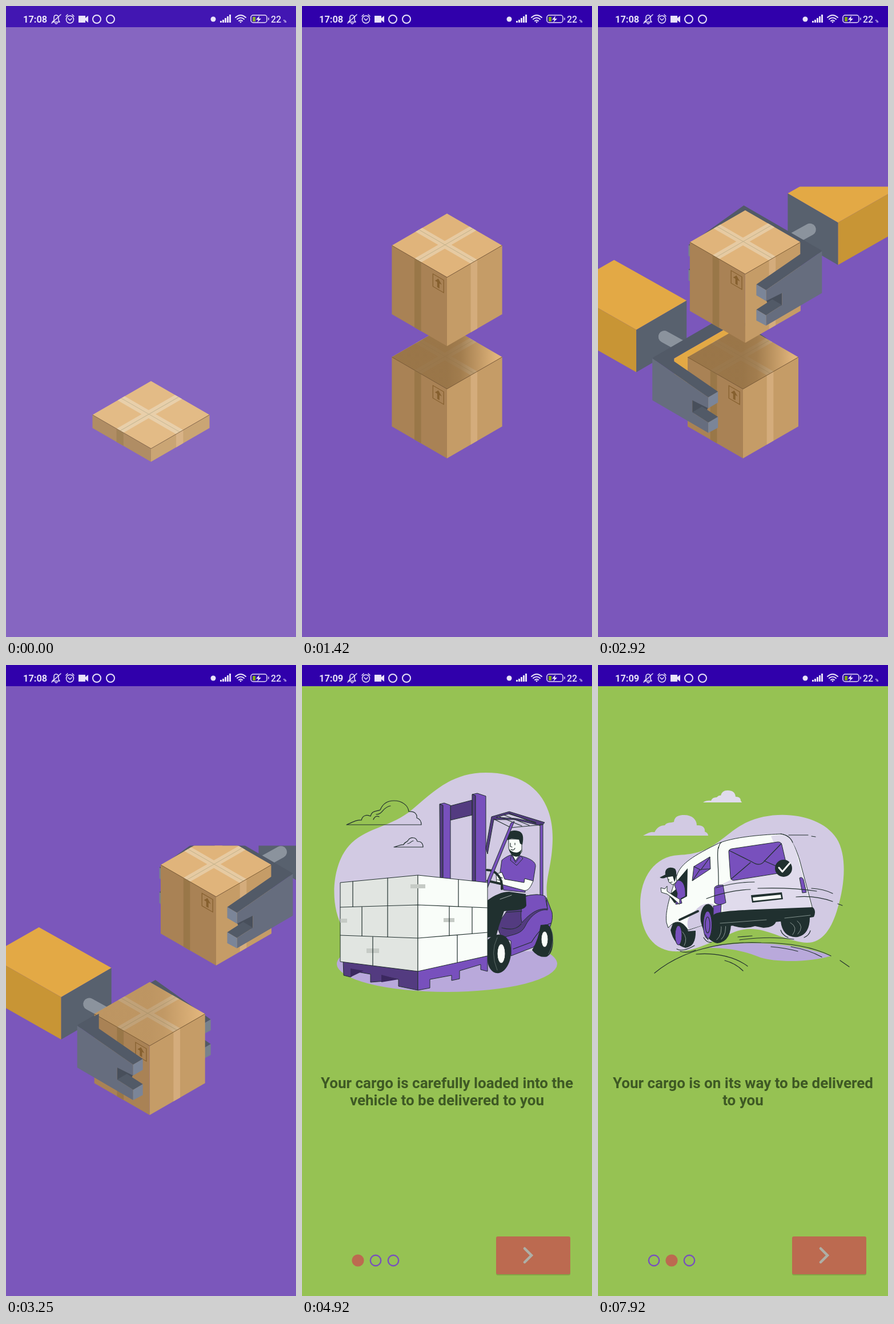
These frames come from a looping animation (508x1102 px, 8 s). An HTML page with a canvas:

```html
<!DOCTYPE html>
<html lang="en">
<head>
<meta charset="utf-8">
<title>Parcel onboarding</title>
<style>
html, body { margin: 0; width: 100%; height: 100%; overflow: hidden; background: #7b57bb; }
canvas, svg { position: absolute; left: 0; top: 0; width: 508px; height: 1102px; }
text { font-family: Roboto, sans-serif; }
.caption { font-size: 26px; font-weight: 700; fill: #3e5924; text-anchor: middle; }
.line { fill: none; stroke: #22302f; stroke-width: 1.2; stroke-linecap: round; stroke-linejoin: round; }
.edge { stroke: #22302f; stroke-width: 1; stroke-linejoin: round; }
.white { fill: #f9fdf9; } .grey { fill: #e1e5e1; } .label { fill: #c5cac5; }
.purple { fill: #7850bd; } .deep { fill: #533b80; } .dark { fill: #20302f; }
.blob { fill: #d2cae3; } .floor { fill: #b9a9db; }
.hollow { fill: none; stroke: #7850bd; stroke-width: 2.4; } .brick { fill: #bc6a50; }
.icon { fill: none; stroke: #e9e2f8; stroke-width: 1.5; stroke-linecap: round; stroke-linejoin: round; }
.solid { fill: #e9e2f8; }
</style>
</head>
<body>
<canvas id="stage" width="508" height="1102"></canvas>
<svg viewBox="0 0 508 1102">
<g id="pages">
  <rect y="37" width="508" height="1065" fill="#96c253"/>
  <g id="loading">
    <ellipse class="floor" cx="254" cy="522" rx="193" ry="49"/>
    <path class="blob" d="M72 460C48 420 52 350 82 316C108 286 150 284 186 258C226 226 258 188 322 188C396 188 440 230 439 305C438 355 424 375 430 410L410 500H100Z"/>
    <path class="line" d="M78 279C90 274 96 270 104 271C106 262 114 261 120 264C123 253 132 256 137 253C142 241 150 237 161 237C175 237 186 245 187 256C198 255 202 261 201 267C207 269 209 274 209 279ZM125 270C127 264 132 263 135 265M130 261C143 260 140 249 155 246M161 318C169 316 173 313 178 314C179 309 184 310 186 306C190 300 200 300 202 308C209 308 212 312 212 318ZM185 312C190 312 190 308 195 307"/>
    <g class="edge">
      <path class="deep" d="M260 246L298 236V262L260 271ZM241 243L247 245V380H242ZM298 226L304 228V385H298Z"/>
      <path class="purple" d="M241 243L249 241L260 245V380H247V245ZM298 226L307 224L322 229V385H304V228Z"/>
      <path class="deep" d="M322 320L332 265L363 256L425 275L420 281L372 270L336 270L325 330Z"/>
      <path class="blob" d="M340 266L362 260L410 275L375 268Z"/>
      <path class="purple" d="M417 278H422V410H417Z"/>
      <path class="line" d="M346 265L385 281M354 262L398 280M363 259L410 277M336 269L366 284L421 279"/>
      <path class="deep" d="M341 455L360 428L388 424L392 403L412 401L425 404L431 430L390 470L350 478Z"/>
      <path class="purple" d="M352 476C372 470 384 470 391 456C399 439 416 425 430 428L428 406L438 432C440 445 436 452 434 460L405 493L366 508L366 482Z"/>
      <path class="purple" d="M391 404C404 400 420 400 426 404L430 426C410 424 396 438 385 450C382 436 384 420 391 404Z"/>
    </g>
    <path class="line" d="M357 432L385 430M350 459C365 463 376 462 384 452M370 496L402 484C414 465 426 454 436 451"/>
    <path class="dark" d="M325 411C337 402 350 396 363 396L392 400L393 420C390 430 366 428 354 430L345 456L340 474L325 476Z"/>
    <g class="edge">
      <path class="purple" d="M350 341C359 333 366 332 370 330L385 334C400 338 410 344 409 352L405 377L390 374L391 397L353 393L347 362Z"/>
      <path class="white" d="M390 373L405 377C401 387 397 394 390 394L353 384L341 382L340 365L350 362L355 374L389 380Z"/>
      <path class="white" d="M362 304L385 304L385 326L374 342L368 331L362 320Z"/>
      <path class="purple" d="M367 331L374 345L383 333L387 338L376 350L365 341Z"/>
    </g>
    <path class="dark" d="M359 302C359 290 369 287 379 290C387 292 389 300 386 314L382 312L380 305L367 303L360 306ZM362 321C367 327 379 332 385 321L382 332C376 338 365 334 362 321Z"/>
    <path class="line" d="M365 311V317L368 318M373 311V314M366 322Q371 325 373 320M364 298Q369 293 380 296M343 369L351 372M342 375L351 377"/>
    <path class="line" stroke-width="3" style="stroke-width:4" d="M324 358C341 358 352 374 350 391M325 377L348 382"/>
    <path class="line" style="stroke-width:.7;stroke:#dce2df" d="M347 409L367 402"/>
    <path class="purple edge" d="M366 276L372 273L325 389L325 375Z"/>
    <ellipse class="dark" cx="428" cy="481" rx="12" ry="28"/>
    <path class="dark" d="M403 498Q414 480 418 454L430 453L430 509Q415 513 403 498Z"/>
    <ellipse class="white edge" cx="425" cy="479" rx="6" ry="14"/>
    <path class="dark" d="M325 480C338 467 358 466 365 488C370 510 360 535 345 538C333 540 325 527 325 515Z"/>
    <ellipse class="white edge" cx="349" cy="504" rx="7" ry="17"/>
    <path class="line" style="stroke:#81908c;stroke-width:.6" d="M342 476Q329 502 342 533M435 457Q446 480 432 505"/>
    <path class="deep edge" d="M72 516L203 533V568L169 561V549L145 544L145 552L120 554V540L97 536L85 545L73 542Z"/>
    <path class="purple edge" d="M203 533L325 508V535L313 532V523L276 534V548L262 551V542L224 549V564L203 568Z"/>
    <path fill="#3b285f" d="M85 530L108 534L85 545ZM139 541L169 549L139 554Z"/>
    <path class="grey edge" d="M67 380L203 367V535L67 518Z"/>
    <path class="white edge" d="M203 367L325 380V508L203 535Z"/>
    <path class="label" d="M190 383H216V390H190ZM248 442H267V449H248ZM67 443H79V450H67ZM113 495H135V503H113Z"/>
    <path class="line" d="M67 423L203 419L325 424M67 472L203 477L325 467M89 378V422M150 372V420M105 422V473M150 421V475M124 474V525M274 375V422M258 421V473M298 423V469M272 472V519"/>
    <text class="caption" x="254" y="739">Your cargo is carefully loaded into the</text>
    <text class="caption" x="254" y="769">vehicle to be delivered to you</text>
    <circle class="brick" cx="98" cy="1040" r="10.6"/>
    <circle class="hollow" cx="129" cy="1040" r="9.2"/>
  </g>
  <g id="driving">
    <path class="blob" d="M74 418C74 370 100 334 141 332C205 330 215 298 260 275C310 251 390 259 418 303C437 333 432 385 420 424C409 463 390 491 356 484C310 476 281 448 235 468C196 485 167 502 131 500C91 496 74 460 74 418Z"/>
    <path class="blob" d="M79 298C87 294 91 291 99 292C103 284 109 280 117 280C121 274 128 276 133 274C134 264 142 262 151 262C165 262 173 270 173 280C184 279 188 285 187 291C192 293 193 296 193 298Z"/>
    <path fill="#e0dbec" d="M184 240Q190 236 198 237Q200 231 208 231Q212 227 215 228Q217 219 227 219Q240 219 241 230Q250 230 250 237L252 240Z"/>
    <path class="floor" d="M190 494C265 478 350 487 408 508C370 520 310 519 285 511C260 501 231 493 190 494Z"/>
    <path class="line" d="M99 538C146 499 214 482 286 485C341 485 378 493 408 508M424 516L440 527M172 505C207 502 241 510 262 526M222 516Q241 521 254 534M303 492Q328 494 350 500M338 492Q371 498 392 510M245 475L270 473M248 480Q300 473 343 479M138 496Q148 502 169 490M144 500Q155 504 171 498"/>
    <path class="dark" d="M232 452L312 447Q310 458 290 459L275 456Q258 462 238 456ZM320 447L371 438Q372 470 350 475Q323 477 320 447Z"/>
    <path class="dark" d="M133 446Q151 445 158 465L171 464Q172 492 153 494Q133 489 127 463Z"/>
    <ellipse class="purple edge" cx="141" cy="472" rx="6" ry="17"/>
    <path class="white edge" d="M120 450C117 430 127 400 139 365C145 350 159 337 206 314C233 299 300 296 320 295C336 296 345 315 353 340L375 422L374 433L205 447L158 463Q141 437 123 459Z"/>
    <path fill="#e0dbec" d="M303 299C330 292 340 300 348 329L374 424L218 430L219 382L231 376L331 362Z"/>
    <path fill="#d2cae3" d="M170 429Q186 411 205 419L201 449L159 462Q151 443 170 429Z"/>
    <path class="line" d="M211 318C207 330 212 350 211 386M211 320Q213 311 216 310M320 295Q336 297 341 310"/>
    <path class="dark" d="M180 448C177 422 193 408 202 425L206 447L233 444Q235 483 209 486Q188 482 180 448Z"/>
    <ellipse class="purple edge" cx="192" cy="454" rx="7.5" ry="24"/>
    <ellipse class="line" cx="192" cy="454" rx="4" ry="14"/>
    <path class="line" style="stroke:#a5b2ad;stroke-width:.8" d="M215 450Q219 470 208 480M223 448Q226 470 216 479M148 466Q158 477 151 490M337 450Q351 458 341 471M349 447Q362 457 350 470"/>
    <path class="purple edge" d="M204 389Q206 384 219 384L224 415Q211 422 204 415ZM202 421L216 418L215 435L202 440ZM353 372Q357 369 360 375L365 397L358 398Z"/>
    <path class="dark" d="M202 437C206 430 240 429 276 427L376 423Q383 429 378 440Q320 450 209 457Q200 453 202 437Z"/>
    <path class="line" style="stroke:#9aa9a4;stroke-width:.8" d="M214 451L295 445M327 442L372 437"/>
    <path class="purple edge" d="M229 326Q229 322 234 321L315 309Q321 309 322 314L332 357Q332 362 327 362L239 376Q233 377 232 370ZM168 352L196 335L197 356L165 377Z"/>
    <path class="line" d="M230 324L270 344Q284 353 292 342L321 312M233 374L267 345M291 342L330 359M168 352L180 358L196 336M166 376L178 358M182 357L196 356"/>
    <path class="dark" d="M268 402L322 397L324 409L270 415Z"/>
    <path class="white" d="M271 406L320 401L321 407L272 412Z"/>
    <path class="line" style="stroke-width:4" d="M143 445L175 430"/>
    <circle class="dark" cx="325" cy="355" r="15"/>
    <path class="line" style="stroke:#fff;stroke-width:3" d="M317 354L323 361L336 346"/>
    <path class="line" d="M334 297L368 297M374 299L381 300M207 389Q242 379 274 379M190 408Q230 393 267 392M280 390Q337 388 383 395M374 390Q395 391 411 399M347 405Q381 402 411 413M420 417L428 420M185 476Q191 486 199 484M188 471L193 480M372 464Q370 472 361 476M320 463Q323 472 333 476"/>
    <path class="dark" d="M157 355L156 404L134 416L124 402L136 392L140 375Z"/>
    <path class="purple edge" d="M139 376C149 375 154 386 153 404L145 408L147 416L136 418L139 399L134 384Z"/>
    <path class="white edge" d="M121 369L137 366L138 378L131 384L124 379ZM143 409L143 418L132 408L121 400L111 397L110 389L117 391L121 386L121 395L134 404Z"/>
    <path class="dark" d="M108 371L118 366C116 354 127 351 135 356C139 361 137 372 134 379L131 369L119 371Q113 374 108 371Z"/>
    <path class="line" d="M124 374V376M126 380L130 379"/>
    <text class="caption" x="254" y="739">Your cargo is on its way to be delivered</text>
    <text class="caption" x="254" y="769">to you</text>
    <circle class="hollow" cx="98" cy="1040" r="9.2"/>
    <circle class="brick" cx="129" cy="1040" r="10.6"/>
  </g>
  <circle class="hollow" cx="160" cy="1040" r="9.2"/>
  <rect x="340" y="1000" width="130" height="66" rx="3" fill="#4f6b25" opacity=".3"/>
  <rect class="brick" x="340" y="998" width="130" height="66" rx="3"/>
  <path d="M390 1019L402 1031L390 1043" fill="none" stroke="#aeafa6" stroke-width="4.5" stroke-linecap="round"/>
</g>
<rect width="508" height="37" fill="#3000ab"/>
<text class="solid" id="clock" x="30" y="28.5" font-size="16.4" font-weight="700"></text>
<g class="icon">
  <path d="M81 28H94L92 25V20Q91 16 88 16Q84 16 84 20V25ZM86 30Q88 32 90 30M80 30L96 15"/>
  <circle cx="112" cy="23.5" r="6.5"/><path d="M109 22L112 25L115 22M105 18L108 15M119 18L116 15"/>
  <circle cx="159" cy="23" r="7" stroke-width="2"/><circle cx="183" cy="23" r="7" stroke-width="2"/>
  <path d="M402 20Q411 12 420 20M405 23Q411 18 417 23M408 26Q411 23.500 414 26" stroke-width="2"/>
  <rect x="429" y="16" width="28" height="13" rx="4"/><path d="M460 21V24"/>
</g>
<rect x="432" y="19" width="5" height="8" fill="#7ea51b"/>
<path class="solid" d="M127 17H139V21L144 17V29L139 25V29H127ZM375 26H378V29H375ZM379 24H382V29H379ZM383 21H386V29H383ZM387 18H390V29H387ZM391 15H394V29H391ZM409 27H413L411 30ZM444 17L438 24H442L440 29L447 22H443Z"/>
<circle class="solid" cx="363" cy="23" r="4.5"/>
<text class="solid" x="464" y="28.5" font-size="16" font-weight="500">22</text>
<text class="solid" x="485.500" y="28.500" font-size="8" font-weight="700">%</text>
<rect id="haze" width="508" height="1102" fill="#fff"/>
</svg>
<script>
const LOOP = 8000;
const ISO = 0.577;
const ctx = document.getElementById('stage').getContext('2d');
const [pages, loading, driving, clock, haze] =
  ['pages', 'loading', 'driving', 'clock', 'haze'].map(id => document.getElementById(id));

const span = (t, from, to) => Math.min(1, Math.max(0, (t - from) / (to - from)));
const mix = (a, b, p) => a + (b - a) * p;
const smooth = p => p * p * (3 - 2 * p);

function poly(color, ...pts) {
  ctx.beginPath();
  for (let i = 0; i < pts.length; i += 2) ctx.lineTo(pts[i], pts[i + 1]);
  ctx.closePath();
  ctx.fillStyle = color;
  ctx.fill();
}

function within(paint, ...matrix) {
  ctx.save();
  ctx.transform(...matrix);
  paint();
  ctx.restore();
}

// (x, y) is the lowest corner; w and d are half the top face, h is the height.
function box(x, y, w, d, h, shade = 0) {
  const front = y - h, mid = front - d;
  const rect = (color, ...r) => { ctx.fillStyle = color; ctx.fillRect(...r); };

  within(() => {
    rect('#a98255', 0, 0, w, h);
    rect('#997748', w * .41, 0, w * .12, h);
    if (h < 60) return;
    const lx = w * .745, ly = h * .068;
    ctx.strokeStyle = '#86602f';
    ctx.lineWidth = 1.3;
    ctx.strokeRect(lx, ly, w * .195, 22);
    within(() => poly('#86602f', 0, -8, 6, -1, 2, -1, 2, 8, -2, 8, -2, -1, -6, -1),
      1, 0, 0, 1, lx + w * .0975, ly + 11);
  }, 1, d / w, 0, 1, x - w, mid);

  within(() => {
    rect('#c59c67', 0, 0, w, h);
    rect('#d4ac7c', w * .43, 0, w * .12, h);
  }, 1, -d / w, 0, 1, x, front);

  within(() => {
    rect('#e0b47b', 0, 0, 1, 1);
    rect('#e6caa2', .41, 0, .12, 1);
    rect('#e6caa2', 0, .43, 1, .12);
    rect('#c3b28b', .467, 0, .01, 1);
    rect('#c3b28b', 0, .487, 1, .01);
  }, w, d, w, -d, x - w, mid);

  if (shade > 0) {
    const shadow = ctx.createLinearGradient(x, 0, x + w, 0);
    shadow.addColorStop(0, 'rgba(146,111,67,.9)');
    shadow.addColorStop(.25, 'rgba(146,111,67,.8)');
    shadow.addColorStop(.9, 'rgba(146,111,67,0)');
    ctx.globalAlpha = shade;
    poly(shadow, x - w, mid, x, mid - d, x + w, mid, x, front);
    ctx.globalAlpha = 1;
  }
  ctx.beginPath();
  ctx.moveTo(x - w, mid);
  ctx.lineTo(x, front);
  ctx.lineTo(x + w, mid);
  ctx.strokeStyle = '#735530';
  ctx.lineWidth = .9;
  ctx.stroke();
}

function armBack() {
  poly('#e3a945', 331, 328, 458, 257, 546, 307, 419, 379);
  poly('#c89535', 419, 379, 546, 307, 546, 381, 419, 453);
  poly('#58616e', 331, 328, 419, 379, 419, 453, 331, 402);
  ctx.beginPath();
  ctx.moveTo(370, 391);
  ctx.lineTo(330, 413);
  ctx.lineCap = 'round';
  ctx.lineWidth = 21;
  ctx.strokeStyle = '#8b939d';
  ctx.stroke();
  ctx.lineCap = 'butt';
  poly('#e3a945', 254, 372, 353, 429, 353, 501, 254, 444);
  poly('#4e5562', 174, 428, 254, 372, 254, 444, 174, 489, 174, 471, 202, 455, 202, 435, 174, 446);
  poly('#525a67', 254, 349, 391, 428, 353, 429, 254, 372, 174, 428, 157, 418);
  poly('#525a67', 157, 461, 174, 471, 204, 450, 188, 440);
  poly('#78828d', 157, 418, 174, 428, 174, 446, 157, 437);
  poly('#78828d', 157, 461, 174, 471, 174, 489, 157, 480);
}

function armFront() {
  poly('#484f5b', 293, 514, 321, 500, 321, 524, 300, 530);
  poly('#525a67', 276, 531, 304, 513, 321, 523, 293, 541);
  poly('#525a67', 276, 487, 353, 434, 353, 408, 391, 429, 293, 497);
  poly('#666d7e', 293, 497, 391, 429, 391, 502, 293, 559, 293, 541, 321, 523, 321, 502, 293, 516);
  poly('#7b8598', 276, 487, 293, 497, 293, 516, 276, 506);
  poly('#7b8598', 276, 531, 293, 541, 293, 559, 276, 550);
}

function drawParcels(t) {
  if (t < 700) {
    const p = smooth(span(t, 0, 670));
    box(254, mix(796, 791, p), mix(102.5, 90, p), mix(59, 56, p), mix(23, 251, p));
    return;
  }
  const s = t - 700;
  const wobble = Math.exp(-s / 250) * Math.cos(s / 110);
  const hover = Math.exp(-s / 350) * Math.cos(s / 220);
  const w = 97 - 7 * wobble, h = 121 + 4 * wobble;

  const rightIn = 380 * (1 - span(t, 2150, 2750)) ** 3;
  const rightOut = 420 * span(t, 2880, 3600) ** 2;
  const leftIn = 400 * (1 - span(t, 2300, 3165)) ** 2;
  const leftOut = 436 * span(t, 3200, 3900) ** 2;
  const lift = 34 * smooth(span(t, 3200, 3500));

  const leftX = 32 - leftIn - leftOut;
  const leftArm = [-1, 0, 0, 1, 486 + leftX, 186.5 + leftX * ISO - lift];
  if (t > 2300) within(armBack, ...leftArm);
  box(254 - leftOut, 790 - leftOut * ISO - lift, w, 55.7, h,
    span(t, 700, 1100) * (1 - span(rightOut, 20, 200)));
  if (t > 2300) within(armFront, ...leftArm);

  const rightX = rightIn + rightOut;
  const rightArm = [1, 0, 0, 1, rightX, -rightX * ISO];
  const held = smooth(span(t, 2500, 2850));
  if (t > 2150) within(armBack, ...rightArm);
  box(254 + 2.5 * held + rightOut, 602 + 63 * hover - 13 * held - rightOut * ISO, w, 55.7, h - 1);
  if (t > 2150) within(armFront, ...rightArm);
}

function render() {
  const t = performance.now() % LOOP;
  ctx.fillStyle = '#7b57bb';
  ctx.fillRect(0, 0, 508, 1102);
  if (t < 4200) {
    ctx.save();
    ctx.beginPath();
    ctx.rect(0, 315.5, 508, 508);
    ctx.clip();
    drawParcels(t);
    ctx.restore();
  }
  const slide = 508 * (1 - span(t, 3890, 4170)) ** 3;
  pages.setAttribute('transform', `translate(${slide} 0)`);
  const fade = smooth(span(t, 7000, 7250));
  loading.setAttribute('opacity', 1 - fade);
  driving.setAttribute('opacity', fade);
  clock.textContent = t < 4250 ? '17:08' : '17:09';
  haze.setAttribute('opacity', .085 * (1 - span(t, 60, 160)));
  requestAnimationFrame(render);
}
render();
</script>
</body>
</html>
```
